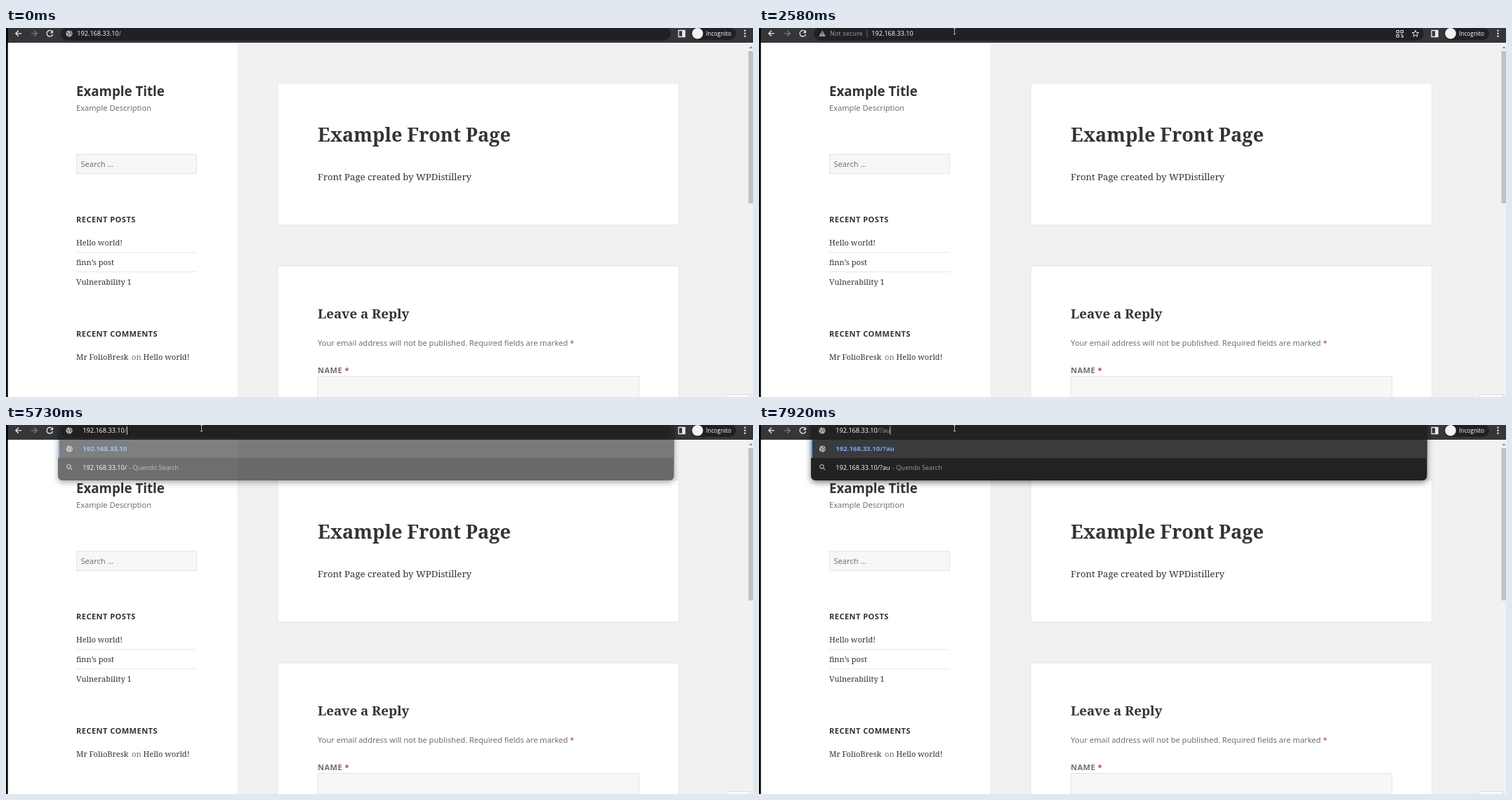
An HTML page that plays this animation: 1064 px wide and 526 px high, repeating every 8 s.

```html
<!DOCTYPE html>
<html lang="en">
<head>
<meta charset="utf-8">
<title>Browser address bar</title>
<style>
  html, body { margin: 0; width: 100%; height: 100%; overflow: hidden; background: #fff; }
  svg { display: block; width: 1064px; height: 526px; }
  text { white-space: pre; fill: #333; }
  .serif { font: 11.09px "Noto Serif", serif; }
  .sans { font: 11.09px "Noto Sans", sans-serif; }
  .ui { font: 9.15px "Open Sans", sans-serif; fill: #fff; }
  .bold { font-weight: 700; }
  .caps { font-weight: 700; letter-spacing: .04em; }
  .soft { fill: #707070; }
  .dim { fill: #9aa0a6; }
  .star { fill: #b0463a; }
  .card { fill: #fff; stroke: #e6e6e6; }
  .field { fill: #f7f7f7; stroke: #e4e4e4; }
  .line { fill: none; stroke: #e8eaed; stroke-width: 1.3; }
  .grey { stroke: #9aa0a6; }
</style>
</head>
<body>
<svg viewBox="0 0 1064 526">
  <defs>
    <g id="globe">
      <circle r="4.6" fill="#b4b8bc"/>
      <path d="M-3.8 -1.6 L-1 -.4 L-.6 1.4 L-1.6 3.6 M.4 -4 L1 -2 L3 -1 L2 1.4 L3 2.6" fill="none" stroke="#35363a"/>
    </g>
    <filter id="shadow" x="-5%" y="-20%" width="110%" height="160%">
      <feDropShadow dx="0" dy="3" stdDeviation="4" flood-opacity=".5"/>
    </filter>
  </defs>

  <!-- page -->
  <rect x="329.5" width="735" height="526" fill="#f1f1f1"/>
  <text class="sans bold" x="100" y="96.5" style="font-size:18.72px">Example Title</text>
  <text class="sans soft" x="100" y="118">Example Description</text>
  <rect class="field" x="100.5" y="180" width="171" height="27.5"/>
  <text class="sans soft" x="106.5" y="198">Search …</text>
  <text class="sans caps" x="100" y="277">RECENT POSTS</text>
  <text class="serif" x="100" y="310">Hello world!</text>
  <text class="serif" x="100" y="338">finn’s post</text>
  <text class="serif" x="100" y="365.7">Vulnerability 1</text>
  <path d="M100 320H272M100 347.7H272" stroke="#e6e6e6"/>
  <text class="sans caps" x="100" y="439.5">RECENT COMMENTS</text>
  <text class="serif" x="100" y="472.7">Mr FolioBresk<tspan class="soft" x="179">on</tspan> Hello world!</text>

  <rect class="card" x="387" y="78.5" width="571.5" height="202.5"/>
  <text class="serif bold" x="444" y="162.3" style="font-size:27.04px">Example Front Page</text>
  <text class="serif" x="444" y="217" style="font-size:13.17px">Front Page created by WPDistillery</text>
  <rect class="card" x="387" y="339" width="571.5" height="200"/>
  <text class="serif bold" x="444" y="414.3" style="font-size:18.72px">Leave a Reply</text>
  <text class="sans soft" x="444" y="453">Your email address will not be published. Required fields are marked <tspan class="star">*</tspan></text>
  <text class="sans caps soft" x="444" y="491.5">NAME <tspan class="star">*</tspan></text>
  <rect class="field" x="444" y="496.5" width="457.5" height="40"/>

  <rect x="1057" y="21" width="7" height="505" fill="#f1f1f1"/>
  <rect x="1057.5" y="33" width="6.5" height="217" fill="#c1c1c1"/>
  <path d="M1058.5 29L1061 26L1063.5 29Z" fill="#888"/>
  <rect x="1026.5" y="522.5" width="33" height="8" fill="#fafafa" stroke="#ddd"/>

  <!-- toolbar -->
  <rect width="1064" height="21" fill="#35363a"/>
  <rect width="2.7" height="526"/>
  <path class="line" d="M22 7.8H14M17.8 3.8L13.8 7.8L17.8 11.8"/>
  <path class="line" d="M36 7.8H44M40.2 3.8L44.2 7.8L40.2 11.8" style="stroke:#7b7d80"/>
  <g id="reload">
    <path class="line" d="M65.6 4.8A4.3 4.3 0 1 0 66.6 9"/>
    <path d="M67 3V7.2H62.8Z" fill="#e8eaed"/>
  </g>
  <path id="stop" class="line" d="M58.5 4L66 11.5M66 4L58.5 11.5"/>
  <rect id="pill" x="78" y="-2" width="869" height="20" rx="10" fill="#202124"/>
  <path class="line" d="M958 3.5H967V12.5H958Z"/>
  <path d="M963 3.5H967V12.5H963Z" fill="#e8eaed"/>
  <rect x="976" y="-1" width="64" height="18" rx="9" fill="#202124"/>
  <circle cx="985" cy="7.8" r="7.8" fill="#f1f3f4"/>
  <text class="ui" x="997" y="10.8" style="font-size:8.3px">Incognito</text>
  <g fill="#e8eaed"><circle cx="1052.5" cy="3.8" r="1.2"/><circle cx="1052.5" cy="7.8" r="1.2"/><circle cx="1052.5" cy="11.8" r="1.2"/></g>

  <!-- suggestions -->
  <g id="menu">
    <path d="M74 -20H951.5V72Q951.5 79 944.5 79H81Q74 79 74 72Z" fill="#202124" filter="url(#shadow)"/>
    <rect x="74" y="21" width="877.5" height="26" fill="#3a3b3d"/>
    <rect x="74" y="21" width="2" height="26" fill="#669df6"/>
    <use href="#globe" x="90.3" y="34"/>
    <text id="match" class="ui bold" x="109.3" y="37" style="font-size:9.6px;fill:#73a7f8"></text>
    <circle class="line grey" cx="89.5" cy="59.3" r="2.7"/>
    <path class="line grey" d="M91.5 61.3L94.3 64.1"/>
    <text class="ui" x="109.3" y="63.7"><tspan id="query"></tspan><tspan class="dim" dx="3.2">- Quendo Search</tspan></text>
  </g>

  <!-- address bar contents -->
  <use id="site" href="#globe" x="90" y="8"/>
  <g id="insecure">
    <path d="M90.2 3.5L95 12H85.4Z" fill="#9aa0a6"/>
    <path d="M90.2 6.3V9M90.2 10V11" stroke="#202124"/>
    <text class="ui dim" x="101" y="11.3" style="font-size:9.25px">Not secure</text>
    <path d="M154 3V13.5" stroke="#6b6e72"/>
  </g>
  <path id="share" class="line" style="stroke-width:1" d="M908 3.5h3.5v3.5h-3.5zM914 3.5h3.5v3.5h-3.5zM908 9.5h3.5v3.5h-3.5zM914 9.5h1.5v1.5h2v2h-3"/>
  <path id="favorite" class="line" style="stroke-width:1" d="M935 3.2L936.3 6.4L939.7 6.6L937.1 8.8L938 12.2L935 10.3L932 12.2L932.9 8.8L930.3 6.6L933.7 6.4Z"/>
  <rect id="selection" x="160" y="1" width="59.3" height="14.5" fill="#5f80b2"/>
  <text id="url" class="ui" y="11.3"><tspan>192.168.33.10</tspan><tspan id="path" class="dim"></tspan></text>
  <rect id="caret" y="1.5" width=".8" height="12.5" fill="#e8eaed"/>
  <rect id="ring" x="78" y="-2" width="869" height="20" rx="10" fill="none" stroke="#8ab4f8" stroke-width="1.6"/>

  <!-- pointer -->
  <circle id="click" cx="278" cy="4" r="8" fill="#9c9113"/>
  <g id="pointer">
    <path id="arrow" d="M.4 .5V9.4L2.5 7.5L4 10.7L5.4 10L4 7H6.7Z" fill="#fff" stroke="#000" stroke-width=".7"/>
    <path id="beam" d="M-1.7 -4.3H1.7M0 -4.3V4.3M-1.7 4.3H1.7" stroke="#c8c8c8" stroke-width=".9"/>
  </g>
</svg>
<script>
const LOOP = 8000, IP = "192.168.33.10";
const el = {};
document.querySelectorAll("svg [id]").forEach(node => el[node.id] = node);

const show = (node, on) => node.style.display = on ? "" : "none";
const during = (t, ...spans) => spans.some(([from, to]) => t >= from && t < to);

// Pointer stops: time, x, y
const route = [
  [190, 719, 429], [255, 510, 230], [320, 365, 92],
  [520, 356, 83], [590, 343, 70], [660, 333, 60], [730, 327, 54],
  [930, 290, 36], [995, 195, 14], [1060, 106, 8], [1125, 215, 5], [1190, 278.5, 4.5]
];

const typed = t => t < 7060 ? "/" : "/?au".slice(0, t < 7590 ? 2 : t < 7920 ? 3 : 4);

function draw(t) {
  const typing = t >= 5730, loaded = t >= 2510 && !typing;
  const loading = during(t, [2050, 2510]);

  show(el.reload, !loading);
  show(el.stop, loading);
  show(el.site, !loaded);
  show(el.insecure, loaded);
  show(el.share, loaded);
  show(el.favorite, during(t, [2180, 5730]));
  show(el.ring, during(t, [1390, 2050], [3130, 5730]));
  show(el.selection, during(t, [3200, 4940]));

  const x = typing ? 109.3 : loaded ? 160.3 : 101.3;
  el.url.setAttribute("x", x);
  el.path.textContent = loaded ? "" : typing ? typed(t) : "/";
  el.caret.setAttribute("x", x + el.url.getComputedTextLength() - .2);
  show(el.caret, during(t, [1390, 2050], [4940, 5470], [5730, 6270], [6730, LOOP]));

  show(el.menu, typing);
  el.menu.style.opacity = t < 5800 ? .65 : 1;
  el.match.textContent = IP + (t < 7060 ? "" : typed(t));
  el.query.textContent = IP + typed(t);

  show(el.click, during(t, [1390, 1590], [3130, 3400]));
  const stop = route.filter(([at]) => at <= t).pop();
  show(el.pointer, stop);
  if (stop) {
    const [, px, py] = stop, overBar = py < 21;
    el.pointer.setAttribute("transform", `translate(${px} ${py})`);
    show(el.arrow, !overBar);
    show(el.beam, overBar);
  }
}

const start = performance.now();
function tick() {
  draw((performance.now() - start) % LOOP);
  requestAnimationFrame(tick);
}
tick();
</script>
</body>
</html>
```
